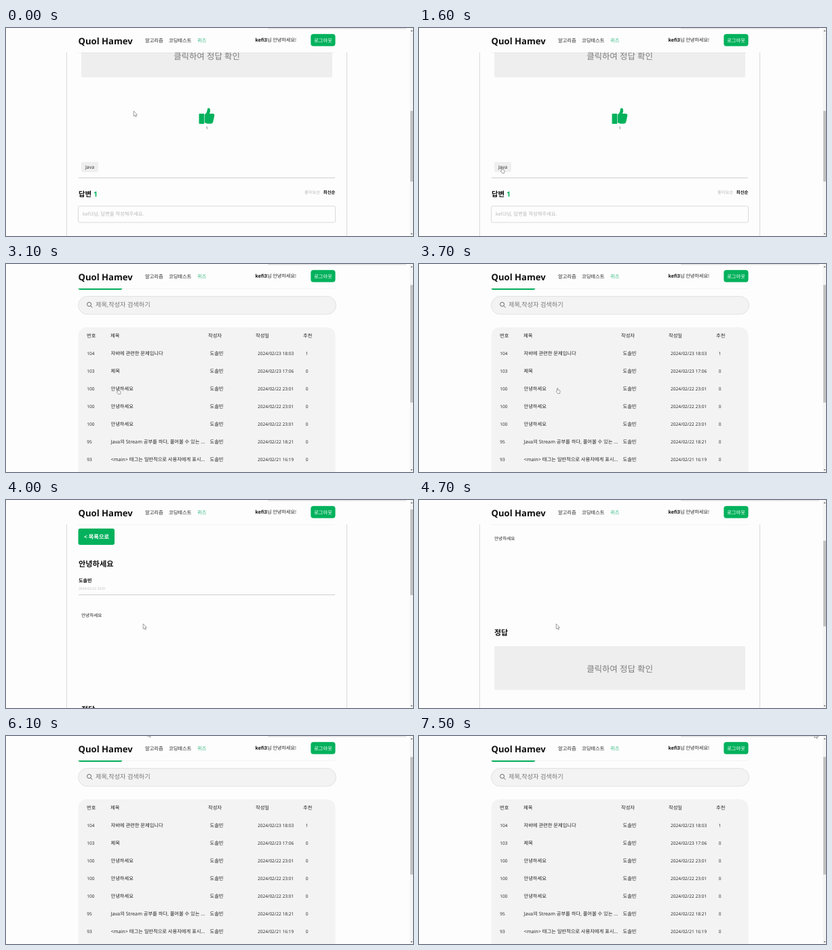
Animation, 600 px wide and 306 px high, one loop 7700 ms. Source, as an HTML page:

```html
<!DOCTYPE html>
<html lang="ko">
<head>
<meta charset="utf-8">
<title>Quiz board</title>
<style>
  @property --s { syntax: "<number>"; inherits: true; initial-value: 0; }

  html, body { margin: 0; width: 100%; height: 100%; overflow: hidden; background: #fdfdfd; }
  svg { display: block; width: 600px; height: 306px; }
  text {
    font: 7.25px "Open Sans", "Noto Sans CJK KR", "Noto Sans CJK", sans-serif;
    fill: #222;
    text-rendering: geometricPrecision;
    white-space: pre;
  }
  .b { font-weight: 700; fill: #111; }
  .w { fill: #fff; }
  .mid { text-anchor: middle; }
  .end { text-anchor: end; }
  .num { font-size: 6.55px; }
  .small { font-size: 5.4px; }
  .soft { fill: #b8b8b8; }
  .green { fill: #03b15c; }
  .panel { fill: #f3f3f3; }
  .chip { fill: #efefef; }
  .line { fill: none; stroke: #d0d0d0; }
  .pale { stroke: #dadada; }
  .bar { fill: #c1c1c1; }

  /* --s is the scroll offset of a page; the scrollbar follows it */
  .body { transform: translateY(calc(var(--s) * -1px)); }
  .bar { transform: translateY(calc(7px + var(--s) * var(--k) * 1px)); }
  .page, .cur { animation: 7.7s step-end infinite; }
  #first { --s: 337; --k: .341; animation-name: first; }
  #list { --k: .567; animation-name: list; }
  #second { --k: .407; animation-name: second; }
  #cursor { animation: move 7.7s step-end infinite; }
  #arrow { animation-name: arrow; }
  #hand { animation-name: hand; }

  @keyframes first {
    0% { visibility: visible; }
    22.07%, 100% { visibility: hidden; }
  }
  @keyframes list {
    0% { visibility: hidden; --s: 200; }
    22.07% { visibility: visible; --s: 200; }
    23.37% { --s: 130; }
    24.67% { --s: 45; }
    25.97% { --s: 0; }
    33.76% { --s: 6; }
    35.06% { --s: 16; }
    36.36% { --s: 27; }
    37.66% { --s: 36; }
    38.96% { --s: 42; }
    49.35% { visibility: hidden; }
    77.92%, 100% { visibility: visible; --s: 42; }
  }
  @keyframes second {
    0% { visibility: hidden; --s: 42; }
    49.35% { visibility: visible; --s: 37; }
    50.64% { --s: 28; }
    51.94% { --s: 17; }
    53.24% { --s: 6; }
    54.54% { --s: 0; }
    59.74% { --s: 40; }
    61.03% { --s: 130; }
    62.33% { --s: 230; }
    63.63% { --s: 320; }
    64.93% { --s: 380; }
    66.23% { --s: 403; }
    77.92%, 100% { visibility: hidden; --s: 403; }
  }
  @keyframes move {
    0% { transform: translate(188px, 122px); }
    3.89% { transform: translate(188px, 122px); animation-timing-function: steps(7, start); }
    12.98% { transform: translate(112px, 207px); animation-timing-function: steps(4, start); }
    18.18% { transform: translate(120px, 205px); }
    28.57% { transform: translate(120px, 205px); animation-timing-function: steps(3, start); }
    32.46% { transform: translate(200px, 167px); }
    33.76% { transform: translate(200px, 167px); animation-timing-function: steps(6, start); }
    41.55% { transform: translate(163px, 183px); animation-timing-function: steps(2, start); }
    44.15% { transform: translate(171px, 181px); animation-timing-function: steps(2, start); }
    46.75% { transform: translate(202px, 182px); }
    64.93% { transform: translate(202px, 182px); animation-timing-function: steps(3, start); }
    68.83% { transform: translate(38.5px, 14.5px); animation-timing-function: steps(1, start); }
    70.12% { transform: translate(7px, 4px); animation-timing-function: steps(3, start); }
    74.02% { transform: translate(0, -12px); }
    77.92% { transform: translate(89px, -12px); animation-timing-function: steps(8, start); }
    88.31% { transform: translate(568px, 9px); animation-timing-function: steps(4, start); }
    93.5% { transform: translate(468px, 9px); }
    94.8% { transform: translate(468px, 9px); animation-timing-function: steps(3, start); }
    98.7%, 100% { transform: translate(583px, -5px); }
  }
  @keyframes arrow {
    0%, 25.97%, 49.35%, 100% { visibility: visible; }
    12.98%, 35.06% { visibility: hidden; }
  }
  @keyframes hand {
    0%, 25.97%, 49.35%, 100% { visibility: hidden; }
    12.98%, 35.06% { visibility: visible; }
  }
</style>
</head>
<body>
<svg viewBox="0 0 600 306">
  <defs>
    <linearGradient id="shade" x2="0" y2="1">
      <stop stop-color="#dcdcdc"/>
      <stop offset="1" stop-color="#fdfdfd"/>
    </linearGradient>
    <!-- lower half of a quiz page -->
    <g id="tail">
      <path class="line pale" d="M89.500 0V656M502.500 0V656"/>
      <path class="line" d="M107 557.500H485"/>
      <text class="b" x="111" y="329" style="font-size:11px">정답</text>
      <rect x="111" y="345" width="370" height="64.500" rx="2" fill="#eee"/>
      <text class="mid" x="296" y="383.300" style="font-size:12.400px;font-weight:500;fill:#7c7c7c">클릭하여 정답 확인</text>
      <g fill="currentColor">
        <rect x="284.500" y="463" width="7.800" height="15" rx="1"/>
        <path d="M292.900 464.500q4-3.500 4-8.500 2.500-2.500 4 .5 .7 3-1 6.500h5.300q2.600.5 2 3l-1.900 9q-.6 2.700-3 2.700h-5.400l-4-1.500z"/>
      </g>
      <rect class="chip" x="111" y="534" width="25" height="15" rx="2"/>
      <text class="mid" x="123.500" y="544.300" style="font-size:6.900px">Java</text>
      <text class="b" x="107" y="585" style="font-size:10.400px">답변</text>
      <text class="soft" x="440" y="581.200" style="font-size:6.300px">좋아요순</text>
      <text class="b end" x="485.500" y="581.200" style="font-size:6.400px">최신순</text>
      <rect class="line pale" x="106.500" y="599" width="379" height="24" rx="2"/>
      <text class="soft" x="113" y="613.300">kefi3님, 답변을 작성해주세요.</text>
    </g>
    <g id="foot">
      <circle cx="115" cy="-1" r="5.500" fill="#71878a"/>
      <text class="small" x="124" y="1.500">© 2024 Hamev, Inc.</text>
      <text class="small end" x="435" y="1.500">Hamev team's tulvod.</text>
      <g fill="#151515">
        <circle cx="443.500" cy="-.5" r="5"/>
        <circle cx="460.300" cy="-.5" r="5"/>
        <circle cx="477" cy="-.5" r="5"/>
      </g>
    </g>
  </defs>

  <rect width="600" height="306" fill="#fdfdfd"/>
  <rect x="595.500" width="4.500" height="306" fill="#f4f4f4"/>

  <g class="page" id="first">
    <g class="body">
      <use href="#tail" color="#03b15c"/>
      <text class="small mid" x="296" y="485.500">1</text>
      <text class="b green" x="129" y="585" style="font-size:10.400px">1</text>
    </g>
    <rect class="bar" x="596" width="4" height="104"/>
  </g>

  <g class="page" id="list">
    <g class="body">
      <rect class="green" x="106.500" y="58" width="65" height="22" rx="3"/>
      <text class="b w mid" x="139.500" y="71.600" style="font-size:7.200px">퀴즈 출제하기 →</text>
      <rect class="panel" x="106.500" y="89.500" width="380" height="26.500" rx="13.200" stroke="#e2e2e2"/>
      <path d="M125 103.700l2.500 2.500M119.600 101.300a3 3 0 1 0 6 0a3 3 0 1 0-6 0" fill="none" stroke="#555" stroke-width=".9"/>
      <text x="132" y="105.300" style="font-size:9.200px;fill:#777">제목,작성자 검색하기</text>
      <rect class="panel" x="106.500" y="135" width="379" height="290" rx="13"/>
      <g id="rows"></g>
      <use href="#foot" y="502"/>
    </g>
    <rect class="bar" x="596" width="4" height="173"/>
  </g>

  <g class="page" id="second">
    <g class="body">
      <rect class="green" x="106.500" y="59" width="53.500" height="24" rx="3"/>
      <text class="b w mid" x="133.500" y="73.500" style="font-size:8.200px">&lt; 목록으로</text>
      <text class="b" x="107" y="115" style="font-size:11.200px">안녕하세요</text>
      <text class="b" x="107" y="138.200" style="font-size:7.100px">도솔빈</text>
      <text class="soft" x="107" y="149.300" style="font-size:5px">2024-02-22 23:01</text>
      <path class="line" d="M107 156.500H485"/>
      <text x="111" y="188.600" style="font-size:6.600px">안녕하세요</text>
      <use href="#tail" color="#c2c2c2"/>
      <text class="small mid" x="296" y="484.700">0</text>
      <text class="b green" x="129" y="585" style="font-size:10.400px">0</text>
      <rect class="chip" x="140" y="534" width="33" height="15" rx="2"/>
      <text class="mid" x="156.500" y="544.300">반복문</text>
      <rect class="chip" x="177" y="534" width="33" height="15" rx="2"/>
      <text class="mid" x="193.500" y="544.300">조건문</text>
      <use href="#foot" y="695"/>
    </g>
    <rect class="bar" x="596" width="4" height="126"/>
  </g>

  <rect width="595" height="36" fill="#fdfdfd"/>
  <path d="M106 36.500H485" stroke="#000" stroke-opacity=".04"/>
  <rect x="386" width="204" height="2.500" fill="url(#shade)"/>
  <text class="b" x="106.500" y="23.800" style="font-size:13.100px">Quol Hamev</text>
  <text x="205" y="20.600">알고리즘</text>
  <text x="240" y="20.600">코딩테스트</text>
  <text x="282" y="20.600" style="fill:#35b87f">퀴즈</text>
  <text x="367.500" y="20.200" style="font-size:7.100px"><tspan class="b">kefi3</tspan>님 안녕하세요!</text>
  <rect class="green" x="449.500" y="9" width="35.800" height="17.500" rx="3.500" stroke="#03b15c" stroke-opacity=".35"/>
  <text class="w mid" x="467.500" y="20.500">로그아웃</text>
  <path d="M596.500 5l1.500-2 1.500 2zM596.500 302l1.500 2 1.500-2z" fill="#666"/>

  <g id="cursor" fill="#fff" stroke="#777" stroke-width=".7" stroke-linejoin="round">
    <path class="cur" id="arrow" d="M.2.2v7.600l1.700-1.600 1.300 2.600 1.200-.5-1.200-2.500h2.400z"/>
    <path class="cur" id="hand" d="M1.500 5V1q.7-.9 1.400 0v2.300l2.300.5q.9.300.8 1.200l-.5 3.500h-3L.3 5.600q.1-1 1.200-.6z"/>
  </g>
</svg>
<script>
  const cell = (x, y, text, cls = "") => `<text x="${x}" y="${y}" class="${cls}">${text}</text>`;
  const heads = [[119, "번호"], [154, "제목"], [298, "작성자"], [368, "작성일"], [438, "추천"]];
  const posts = [
    [104, "자바에 관련한 문제입니다", "23 18:03", 1],
    [103, "제목", "23 17:06", 0],
    [100, "안녕하세요", "22 23:01", 0],
    [100, "안녕하세요", "22 23:01", 0],
    [100, "안녕하세요", "22 23:01", 0],
    [95, "Java의 Stream 공부를 하다, 풀어볼 수 있는 ...", "22 18:21", 0],
    [93, "&lt;main&gt; 태그는 일반적으로 사용자에게 표시...", "21 16:19", 0],
  ];
  const row = ([id, title, day, votes], i) => {
    const y = 176.2 + 25.95 * i;
    return cell(119.3, y, id, "num") + cell(154.5, y, title) + cell(300.5, y, "도솔빈") +
      cell(371, y, "2024/02/" + day, "num") + cell(441.7, y, votes, "num");
  };
  document.getElementById("rows").innerHTML =
    heads.map(([x, name]) => cell(x, 150.4, name)).join("") + posts.map(row).join("");
</script>
</body>
</html>
```
